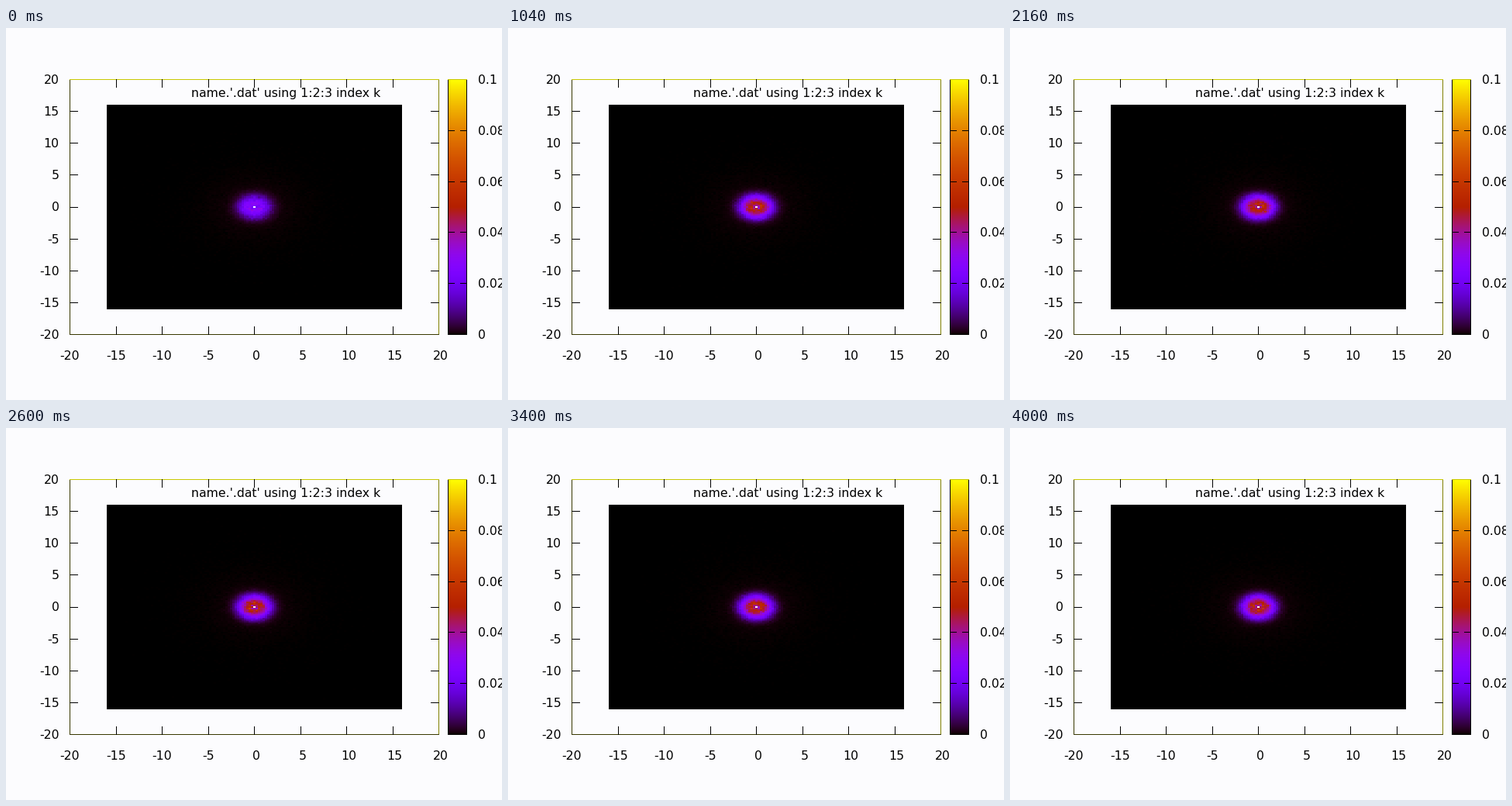
These frames come from a looping animation (640 by 480 pixels, 4040 ms). A matplotlib script:

```python
import math

import numpy as np
import matplotlib.pyplot as plt
from matplotlib.animation import FuncAnimation

W, H, DPI = 640, 480, 100
FRAMES, STEP = 101, 40
PX = 72 / DPI
CELLS = 127
PAPER = np.array([252, 252, 254]) / 255
DARK, OLIVE, YELLOW = "#383800", "#808000", "#c8c800"
LEFT, RIGHT, TOP, BOTTOM = 82.5, 558.5, 66.5, 395.5
BAR_L, BAR_R = 570.5, 594.5

plt.rcParams["font.family"] = "DejaVu Sans"
fig = plt.figure(figsize=(W / DPI, H / DPI), dpi=DPI, facecolor=PAPER)
ax = fig.add_axes([0, 0, 1, 1])
ax.axis("off")


def palette(v):
    """Black, violet, red, yellow ramp for v in 0..1."""
    v = np.clip(v, 0, 1)
    blue = np.clip(np.sin(2 * np.pi * v), 0, 1)
    return np.stack([np.sqrt(v), v ** 3, blue], axis=-1)


def line(x0, y0, x1, y1, color="black"):
    """One pixel wide line, centred on whole pixels."""
    xs = [math.floor(x) + 0.5 for x in (x0, x1)]
    ys = [math.floor(y) + 0.5 for y in (y0, y1)]
    ax.plot(xs, ys, color=color, lw=PX, snap=False,
            solid_capstyle="projecting", zorder=3)


def label(x, y, text, ha="center"):
    ax.text(x, y, text, ha=ha, va="baseline", fontsize=15.7 * PX, zorder=4)


def draw_axes():
    line(LEFT, TOP, LEFT, BOTTOM, DARK)
    line(RIGHT, TOP, RIGHT, BOTTOM, OLIVE)
    line(LEFT, TOP, RIGHT, TOP, YELLOW)
    line(LEFT, BOTTOM, RIGHT, BOTTOM, DARK)
    for k in range(9):
        value = 5 * k - 20
        x = LEFT + (RIGHT - LEFT) * k / 8
        y = BOTTOM + (TOP - BOTTOM) * k / 8
        label(x + (2.5 if value >= 0 else 0), 428, str(value))
        label(68.5, y + 5.5, str(value), "right")
        if 0 < k < 8:
            line(x, TOP, x, TOP + 10)
            line(x, BOTTOM, x, BOTTOM - 10)
            line(LEFT, y, LEFT + 10, y)
            line(RIGHT, y, RIGHT - 10, y)
    label(239, 89, "name.'.dat' using 1:2:3 index k", "left")


def draw_colorbar():
    ramp = palette(np.linspace(1, 0, 330))[:, None, :]
    ax.imshow(ramp, extent=(570, 595, 396, 66), aspect="auto",
              interpolation="nearest", zorder=2)
    line(BAR_L, TOP, BAR_L, BOTTOM)
    line(BAR_R, TOP, BAR_R, BOTTOM)
    line(BAR_L, TOP, BAR_R, TOP, YELLOW)
    line(BAR_L, BOTTOM, BAR_R, BOTTOM)
    for k in range(6):
        y = BOTTOM + (TOP - BOTTOM) * k / 5
        label(609, y + 5.5, f"{k * 0.02:g}", "left")
        if 0 < k < 5:
            line(BAR_L, y, BAR_L + 8, y)
            line(BAR_R, y, BAR_R - 8, y)


grid = np.linspace(-16, 16, CELLS)
radius = np.hypot(*np.meshgrid(grid, grid))
mid = CELLS // 2
weight = 6000 * np.maximum(radius, 0.1)
ring = np.where(radius < 0.4, 0.75, 1.0)
core = np.exp(-(radius / 1.75) ** 2.7)
halo = 0.004 * np.exp(-radius / 1.3)


def density(i):
    """Noisy radial density that settles quickly to a steady state."""
    peak = 0.053 - 0.025 * np.exp(-i / 2)
    counts = np.random.default_rng(i).poisson((peak * core + halo) * weight)
    return ring * counts / weight


def picture(i):
    rgb = palette(density(i) / 0.1)
    rgb[mid, mid] = 1
    return rgb


draw_axes()
draw_colorbar()
cloud = ax.imshow(picture(0), extent=(130, 511, 363, 99), aspect="auto",
                  interpolation="nearest", zorder=1)
ax.set_xlim(0, W)
ax.set_ylim(H, 0)


def update(i):
    cloud.set_data(picture(i))
    return [cloud]


anim = FuncAnimation(fig, update, frames=FRAMES, interval=STEP,
                     repeat=True, repeat_delay=0, blit=False)
plt.show()
```
